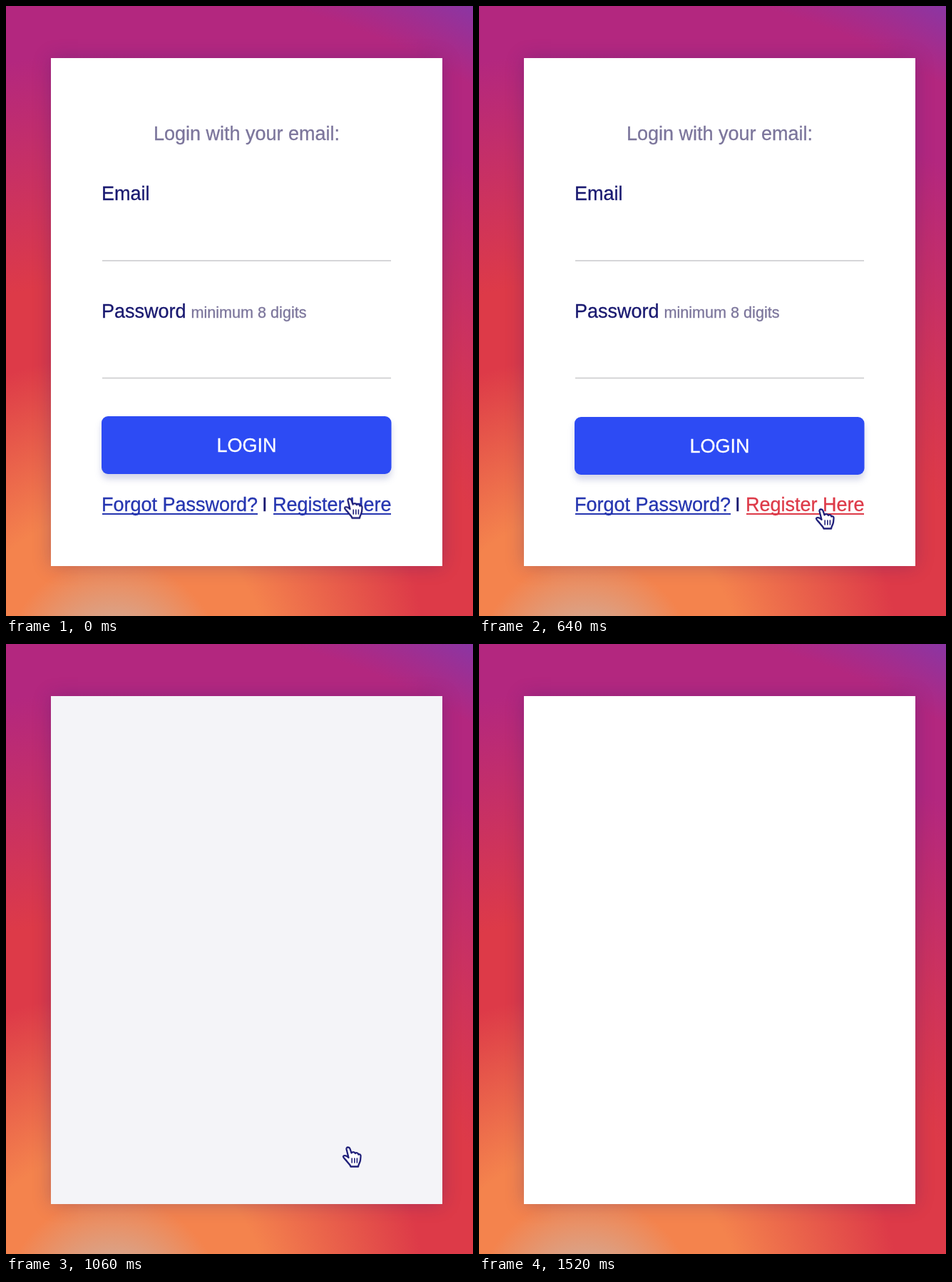
These frames come from a looping animation (655x855 px, 1.54 s). An HTML page:

```html
<!DOCTYPE html>
<html lang="en">
<head>
<meta charset="utf-8">
<title>Login form</title>
<style>
  html, body { margin: 0; width: 100%; height: 100%; overflow: hidden; }
  .stage {
    position: relative; width: 655px; height: 855px; overflow: hidden;
    background: radial-gradient(circle 1060px at 150px 930px,
      #d8a58c 65px, #f4834d 155px, #f4834d 220px,
      #dd3a48 440px, #dd3a48 545px, #b3277f 865px, #b3277f 960px, #8a36a4 1060px);
  }
  .card {
    position: absolute; left: 63px; top: 73px; width: 549px; height: 712px;
    background: #fff; box-shadow: 0 0 24px rgba(40, 30, 120, .28);
  }
  svg { position: absolute; inset: 0; font: 27px "Liberation Sans", Arial, sans-serif; }
  text { stroke: currentColor; stroke-width: .3px; fill: currentColor; }
  .muted { color: #7b759b; }
  .label { color: #191970; }
  .link { color: #2535b0; }
  .link rect { fill: currentColor; }
  .button rect { fill: #2d4bf4; filter: drop-shadow(0 7px 5px rgba(40, 50, 140, .2)); }
  .button text { color: #fff; }

  .card, .form, .button, .register, .hand { animation: 1540ms step-end infinite; }
  .card { animation-name: flash; }
  .form { animation-name: leave; }
  .button { animation-name: settle; }
  .register { animation-name: press; }
  .hand { animation-name: point; }

  @keyframes flash {
    0% { background: #fff; }
    45.4% { background: #192878; animation-timing-function: ease; }
    77.9%, 100% { background: #fff; }
  }
  @keyframes leave {
    0% { visibility: visible; }
    45.4%, 100% { visibility: hidden; }
  }
  @keyframes settle {
    0% { transform: none; }
    4%, 100% { transform: translateY(1px); }
  }
  @keyframes press {
    0% { color: #2535b0; }
    35%, 100% { color: #dd3a48; }
  }
  @keyframes point {
    0% { transform: translate(474px, 689px); visibility: visible; animation-timing-function: ease-out; }
    12% { transform: translate(472px, 706px); }
    27.3% { transform: translate(472px, 704px); }
    70.1%, 100% { transform: translate(472px, 704px); visibility: hidden; }
  }
</style>
</head>
<body>
<div class="stage">
  <div class="card"></div>
  <svg width="655" height="855" viewBox="0 0 655 855">
    <g class="form">
      <text class="muted" x="337.5" y="188" text-anchor="middle">Login with your email:</text>
      <text class="label" x="134" y="272">Email</text>
      <text class="label" x="134" y="437">Password</text>
      <text class="muted" x="259.5" y="437" font-size="21.6">minimum 8 digits</text>
      <path d="M135 357H540M135 521.5H540" stroke="#c9c9cb" stroke-width="1.7"/>
      <g class="button">
        <rect x="134" y="575" width="406.5" height="81" rx="9"/>
        <text x="337.5" y="625" text-anchor="middle">LOGIN</text>
      </g>
      <g class="link">
        <text x="134" y="708">Forgot Password?</text>
        <rect x="135" y="711" width="218" height="2"/>
      </g>
      <text class="label" x="359" y="708">I</text>
      <g class="link register">
        <text x="374" y="708">Register Here</text>
        <rect x="375" y="711" width="165" height="2"/>
      </g>
    </g>
    <g class="hand" stroke="#20207a" stroke-width="2.3" stroke-linejoin="round" stroke-linecap="round">
      <path fill="#fff" d="M5.5 4C5 1 9.5 .5 10.5 3.5L12.5 9.5C13.5 7.5 17 7.5 17.8 10
        C19 8.5 21.8 9 22.3 11.5C24 10.5 26 12 25.5 14.5L25 19.5C24.5 23 22.5 24.5 22 28.5
        H11.5C10.5 25 8 24 6 21C4 18 1 16.5 1 14.5C1.5 12 5.5 13 8.5 16Z"/>
      <path fill="none" d="M13.2 17V23M16.8 17V23M20.4 17V23" stroke-width="1.6"/>
    </g>
  </svg>
</div>
</body>
</html>
```
